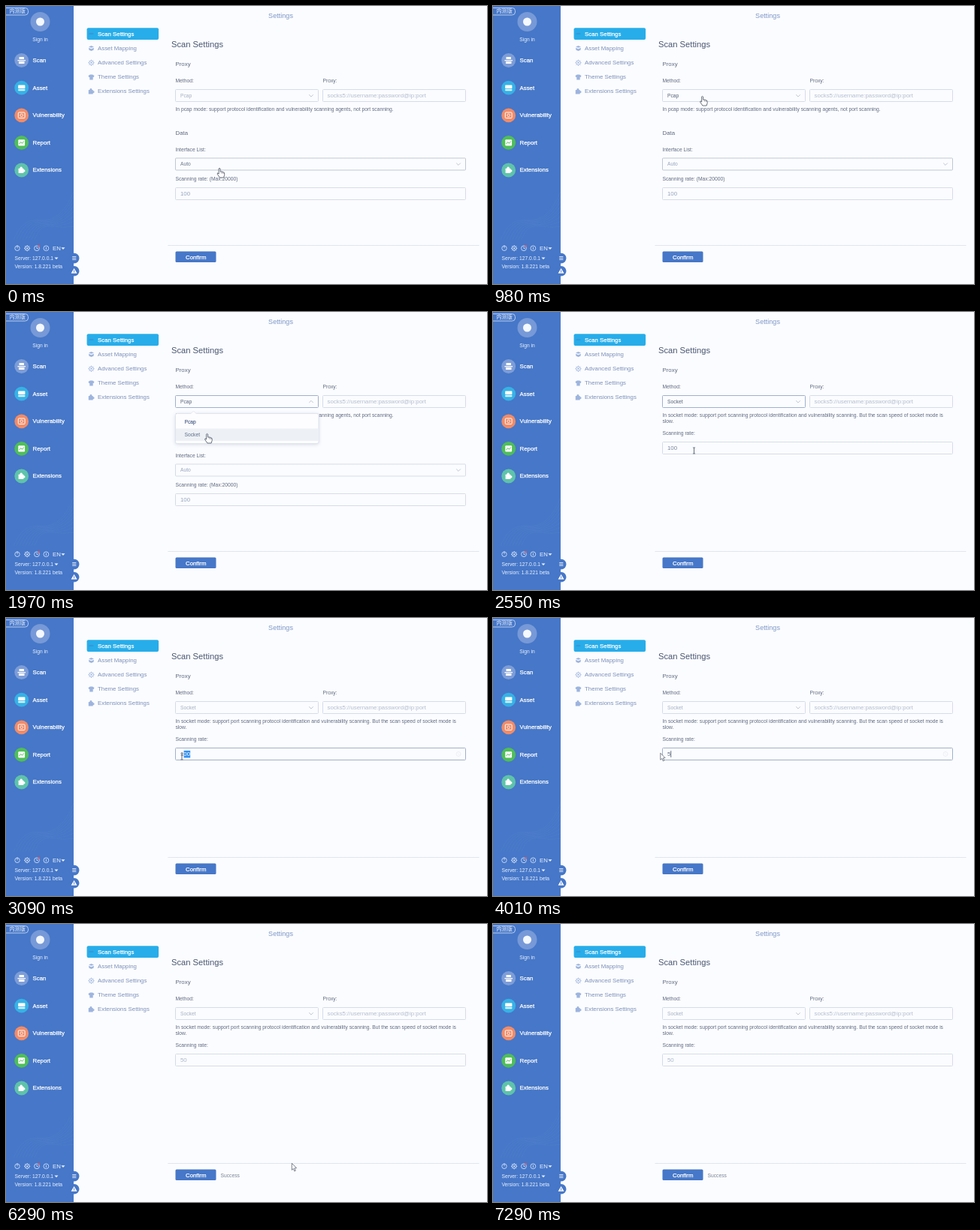
Write an HTML page with a canvas that moves like this. It is 640 by 371 pixels and loops after 7750 ms.

```html
<!DOCTYPE html>
<html lang="en">
<head>
<meta charset="utf-8">
<title>Settings</title>
<style>
html, body { margin: 0; width: 640px; height: 371px; overflow: hidden; background: #fbfcff; }
canvas { display: block; }
</style>
</head>
<body>
<canvas id="stage" width="640" height="371"></canvas>
<script>
const ctx = document.getElementById('stage').getContext('2d');
const LOOP = 7750;
const PAGE = '#fbfcff', BLUE = '#4677c8', LABEL = '#606b81', DARK = '#4a5771',
      PALE = '#aeb8ca', LINE = '#d5dce9', FOCUS = '#a0b0cb', ICON = '#9db4de';
const SMALL = 6.73, MID = 7.85;

// time, shape, x, y: the pointer holds each place until the next entry
const pointer = [
  [0, 'hand', 286, 223], [550, 'hand', 286, 221], [800, 'hand', 285, 190],
  [890, 'hand', 282, 152], [980, 'hand', 280.5, 127], [1630, 'hand', 278, 134],
  [1730, 'hand', 275, 146], [1880, 'hand', 272, 159], [1970, 'hand', 269.5, 169],
  [2340, 'arrow', 267, 167], [2550, 'beam', 267.5, 185], [2810, 'beam', 258, 185],
  [2900, 'beam', 248, 185], [2990, 'beam', 240, 185], [3080, 'beam', 234, 185],
  [3180, 'beam', 228, 185], [3270, 'arrow', 222.5, 180], [4650, 'arrow', 228, 205],
  [4740, 'arrow', 238, 245], [4820, 'arrow', 247, 285], [4910, 'arrow', 256, 325],
  [5100, 'hand', 258, 336], [5190, 'hand', 259.5, 339], [6110, 'arrow', 285, 327],
  [6200, 'arrow', 330, 320], [6290, 'arrow', 380, 319], [6380, 'arrow', 430, 323],
  [6470, 'arrow', 480, 333], [6560, 'arrow', 525, 343], [6650, 'arrow', 556, 351],
  [7110, 'arrow', 588, 358], [7200, 'arrow', 628, 365], [7290, 'none', 0, 0]
];

// y is the middle of the capitals; the baseline sits on a whole pixel
function text(s, x, y, size, color, weight = 0, align = 'left') {
  const base = Math.round(y + size * 0.36 - 0.4);
  ctx.font = `${size}px "Liberation Sans", Arial, "Noto Sans CJK SC", "Noto Sans CJK", sans-serif`;
  ctx.textAlign = align;
  ctx.fillStyle = color;
  ctx.fillText(s, x, base);
  if (weight) {
    ctx.strokeStyle = color;
    ctx.lineWidth = weight;
    ctx.strokeText(s, x, base);
  }
}

function box(x, y, w, h, r, fill, stroke) {
  ctx.beginPath();
  ctx.roundRect(x, y, w, h, r);
  if (fill) { ctx.fillStyle = fill; ctx.fill(); }
  if (stroke) { ctx.strokeStyle = stroke; ctx.lineWidth = 1; ctx.stroke(); }
}

function disc(x, y, r, color) {
  ctx.beginPath();
  ctx.arc(x, y, r, 0, 7);
  ctx.fillStyle = color;
  ctx.fill();
}

function ring(x, y, r, color, width = 0.8) {
  ctx.beginPath();
  ctx.arc(x, y, r, 0, 7);
  ctx.strokeStyle = color;
  ctx.lineWidth = width;
  ctx.stroke();
}

function path(points, x, y, fill, stroke, width = 0.8) {
  ctx.beginPath();
  points.forEach(([px, py]) => ctx.lineTo(x + px, y + py));
  if (fill) { ctx.closePath(); ctx.fillStyle = fill; ctx.fill(); }
  if (stroke) { ctx.strokeStyle = stroke; ctx.lineWidth = width; ctx.stroke(); }
}

function gear(x, y, r, color) {
  ring(x, y, r * 0.72, color, 0.9);
  ctx.lineWidth = 1;
  for (let i = 0; i < 8; i++) {
    const c = Math.cos(i * Math.PI / 4), s = Math.sin(i * Math.PI / 4);
    ctx.beginPath();
    ctx.moveTo(x + c * r * 0.75, y + s * r * 0.75);
    ctx.lineTo(x + c * r, y + s * r);
    ctx.stroke();
  }
  disc(x, y, r * 0.28, color);
}

function puzzle(x, y, s, color) {
  box(x - s, y - s * 0.6, s * 1.7, s * 1.6, 0.5, color);
  disc(x - s * 0.1, y - s * 0.7, s * 0.42, color);
  disc(x + s * 0.8, y + s * 0.2, s * 0.42, color);
}

const chevron = (x, y, dir, color) =>
  path([[-2.8, -1.4 * dir], [0, 1.4 * dir], [2.8, -1.4 * dir]], x, y, null, color, 0.8);

const drop = (x, y) => path([[-2.5, -1.4], [2.5, -1.4], [0, 1.4]], x, y, '#e8effb');

function sideItem(label, y, color) {
  disc(20.7, y, 9.4, color);
  text(label, 35.5, y, MID, '#fff', 0.25);
}

function mesh() {
  ctx.save();
  ctx.beginPath();
  ctx.rect(0, 230, 90, 90);
  ctx.clip();
  ctx.strokeStyle = 'rgba(255,255,255,.06)';
  ctx.lineWidth = 0.6;
  for (let i = 0; i < 8; i++) {
    ctx.beginPath();
    ctx.moveTo(10 + i * 4, 312);
    ctx.bezierCurveTo(35 + i * 2, 255 + i * 4, 60, 320 - i * 3, 91, 245 + i * 7);
    ctx.stroke();
  }
  ctx.restore();
}

function sidebar() {
  ctx.fillStyle = BLUE;
  ctx.fillRect(0, 0, 90, 371);
  mesh();

  box(-4, 2.5, 33.5, 9.5, 4, null, '#b9cdf0');
  text('内测版', 4.5, 7.3, 7.1, '#eef4ff');
  disc(45.5, 21, 13, '#7799d7');
  disc(45.5, 21, 5.5, '#f4f8ff');
  text('Sign in', 45.5, 44.5, SMALL, '#eaf1ff', 0, 'center');

  sideItem('Scan', 72.5, '#7d9dd8');
  box(17.5, 68, 6.5, 3, 0.5, '#fff');
  box(15.5, 72, 10.5, 1.3, 0, '#fff');
  box(17, 74, 7.5, 3, 0.5, '#fff');

  sideItem('Asset', 109.2, '#36b2e6');
  box(16.2, 105.5, 9.2, 4.5, 0.6, '#fff');
  box(16.2, 110.8, 9.2, 2.4, 0.6, '#d6f1fc');

  sideItem('Vulnerability', 145.9, '#f18b68');
  box(16.3, 142, 8.8, 7.6, 1, null, '#fff');
  ring(20.7, 145.8, 1.8, '#fff');

  sideItem('Report', 182.4, '#4fbe58');
  box(16.3, 178.3, 8.8, 8.2, 1, '#fff');
  path([[-3, 1.5], [-1, -1], [0.8, 0.8], [3, -2]], 20.7, 182.5, null, '#4fbe58', 1);

  sideItem('Extensions', 219, '#5ec3aa');
  puzzle(20.6, 219.1, 4, '#fff');

  const pale = '#dfe9fb';
  ring(15, 323.3, 3.2, pale);
  path([[0, -4], [0, 0]], 15, 323.3, null, pale);
  gear(28.2, 323.3, 4, pale);
  ring(41, 323.3, 3.4, pale);
  path([[0, -2], [0, 0.3], [1.7, 0.3]], 41, 323.3, null, pale);
  disc(43.7, 320.3, 1.2, '#f0545a');
  ring(53.4, 323.3, 3.4, pale);
  path([[0, -1.8], [0, 1.8]], 53.4, 323.3, null, pale);
  text('EN', 62, 323.4, MID, '#eaf1ff');
  drop(76, 323.7);
  text('Server: 127.0.0.1', 11.5, 336.6, SMALL, '#eaf1ff');
  drop(67, 336.8);
  text('Version: 1.8.221 beta', 11.5, 348.3, SMALL, '#eaf1ff');

  disc(90.7, 336.6, 6.8, BLUE);
  for (let i = -1; i < 2; i++) box(88.2, 336.2 + i * 2, 5.2, 0.8, 0, '#fff');
  disc(90.7, 353.8, 6.8, BLUE);
  path([[0, -3.8], [4, 3], [-4, 3]], 90.6, 353.8, '#fff');
  path([[0, -1.4], [0, 1.9]], 90.6, 353.8, null, BLUE, 0.9);
}

function nav() {
  text('Settings', 365.5, 13, 9.1, '#7e98c6', 0, 'center');
  box(107.6, 29.3, 95.5, 15.8, 2, '#27adea');
  box(110.5, 36.3, 6, 1.4, 0.5, '#438fd0');
  text('Scan Settings', 122, 37.4, MID, '#fff', 0.25);
  ['Asset Mapping', 'Advanced Settings', 'Theme Settings', 'Extensions Settings']
    .forEach((s, i) => text(s, 122, 56.6 + i * 19.15, MID, '#7c90b9'));
  path([[-3.5, -2], [0, -3.4], [3.5, -2], [0, -0.7]], 113.5, 56.5, ICON);
  path([[-3.5, -0.7], [0, 0.7], [3.5, -0.7], [3, 2.2], [0, 3.5], [-3, 2.2]], 113.5, 56.5, ICON);
  gear(113.5, 75.7, 4, ICON);
  path([[-4, -2], [-1.5, -3.4], [1.5, -3.4], [4, -2], [3, 0.3], [2.2, -0.2],
    [2.2, 3.5], [-2.2, 3.5], [-2.2, -0.2], [-3, 0.3]], 113.5, 95, ICON);
  puzzle(113.3, 114, 3.5, ICON);
}

const field = (x, y, w, border) => box(x, y, w, 16, 1, PAGE, border);

function pcapForm(t) {
  text('In pcap mode: support protocol identification and vulnerability scanning agents, not port scanning.',
    225.5, 138.3, SMALL, LABEL);
  text('Data', 225.5, 169.6, MID, LABEL);
  text('Interface List:', 225.5, 191.5, SMALL, LABEL);
  field(225.5, 203, 386, t < 1350 ? '#c0c7d5' : LINE);
  text('Auto', 232, 211.3, SMALL, t < 800 ? '#6b7789' : '#98a5bd');
  chevron(602, 211, 1, PALE);
  text('Scanning rate: (Max:20000)', 225.5, 231, SMALL, LABEL);
  field(225.5, 242.5, 386, LINE);
  text('100', 232, 250.8, MID, '#98a5bd');
}

function rateInput(t) {
  const focused = t >= 2810 && t < 5370;
  const border = t < 2810 ? LINE : t < 5460 ? FOCUS : t < 5550 ? '#bcc7da' : LINE;
  field(225.5, 173.5, 386, border);
  const value = t < 4010 ? '100' : t < 4190 ? '5' : '50';
  text(value, 232, 181.8, MID, focused ? '#66738a' : t < 2810 ? '#7c879b' : PALE);
  if (focused) {
    ring(602, 181.5, 3, '#e6e9f0', 0.7);
    path([[-1, -1], [1, 1]], 602, 181.5, null, '#e6e9f0');
  }
  if (t >= 2990 && t < 4010) {
    const from = t < 3080 ? 240.7 : t < 3180 ? 236.4 : 232;
    ctx.save();
    ctx.beginPath();
    ctx.rect(from, 177, 245.2 - from, 9.5);
    ctx.clip();
    ctx.fillStyle = '#3390f2';
    ctx.fillRect(from, 177, 20, 10);
    text(value, 232, 181.8, MID, '#fff');
    ctx.restore();
  }
  if (t >= 4010 && t < 5100) box(t < 4190 ? 236.4 : 241, 177.3, 0.8, 8.7, 0, '#4a5364');
}

function socketForm(t) {
  text('In socket mode: support port scanning protocol identification and vulnerability scanning. But the scan speed of socket mode is',
    225.5, 138.3, SMALL, LABEL);
  text('slow.', 225.5, 146.2, SMALL, LABEL);
  text('Scanning rate:', 225.5, 162.3, SMALL, LABEL);
  rateInput(t);
  if (t >= 5460) text('Success', 285.5, 335.5, SMALL, '#7b8496');
}

function methodSelect(t) {
  const active = t >= 1160 && t < 2900;
  field(225.5, 111.5, 190, active ? FOCUS : LINE);
  const dark = t >= 980 && t < 2900;
  text(t < 2250 ? 'Pcap' : 'Socket', 232, 119.7, SMALL, dark ? '#566377' : '#a6b0c2');
  if (t >= 1350 && t < 1630) path([[-2.5, 1], [-1, -0.8], [1, -0.8], [2.4, 1]], 404.5, 124, null, PALE);
  else chevron(406, 119.7, t >= 1630 && t < 2250 ? -1 : 1, PALE);
}

function menu(t) {
  if (t < 1350 || t >= 2340) return;
  ctx.save();
  ctx.globalAlpha = t < 1430 || t >= 2250 ? 0.5 : 1;
  ctx.shadowColor = 'rgba(60,75,110,.22)';
  ctx.shadowBlur = 5;
  ctx.shadowOffsetY = 1;
  box(225.5, 135.5, 190.5, 40, 2, '#fdfdff');
  ctx.shadowColor = 'transparent';
  box(225.5, 135.5, 190.5, 40, 2, null, '#dfe4ed');
  path([[-4, 4], [0, 0], [4, 4]], 249.5, 132, '#fdfdff');
  path([[-4, 4], [0, 0], [4, 4]], 249.5, 132, null, '#dfe4ed');
  if (t >= 1730) {
    ctx.fillStyle = '#edf1f6';
    ctx.fillRect(226, t < 1880 ? 138.5 : 155.5, 189.5, 16.5);
  }
  const down = t < 1630 ? 0 : 0.5;
  text('Pcap', 237.5, 146.6 + down, SMALL, '#3d527d', t < 1880 ? 0.25 : 0.1);
  text('Socket', 237.5, 163 + down, SMALL, '#5f6e89');
  ctx.restore();
}

function form(t) {
  text('Scan Settings', 220, 51, 11.2, DARK);
  text('Proxy', 225.5, 78, MID, LABEL);
  text('Method:', 225.5, 100.3, SMALL, LABEL);
  text('Proxy:', 421.5, 100.3, SMALL, LABEL);
  field(421.5, 111.5, 190, LINE);
  text('socks5://username:password@ip:port', 427.5, 119.8, MID, '#b4bdce');
  methodSelect(t);
  if (t < 2340) pcapForm(t); else socketForm(t);
  ctx.fillStyle = '#e1e5ed';
  ctx.fillRect(215.5, 319, 414, 1);
  box(225.5, 327.6, 54, 14.4, 1.5, BLUE);
  text('Confirm', 252.7, 335.3, MID, '#fff', 0.25, 'center');
  menu(t);
}

const shapes = {
  none() {},
  hand(x, y) {
    ctx.lineJoin = 'round';
    path([[-2.9, -6], [-2, -6.6], [-1, -6], [-0.8, -1.8], [1.2, -2], [3, -1.3], [4.6, -0.4],
      [4.7, 2.5], [3.6, 6], [-1.6, 6], [-4.8, 1.2], [-4.5, -0.2], [-2.8, 1]], x, y, '#fff', '#454e5e', 0.8);
    path([[1.1, -1.8], [1.1, 0.8]], x, y, null, '#667', 0.6);
    path([[3, -1], [3, 1]], x, y, null, '#667', 0.6);
  },
  arrow(x, y) {
    path([[0, 0], [0, 9], [2, 7.2], [3.5, 10.6], [5, 9.9], [3.5, 6.6], [6.3, 6.4]],
      x + 0.3, y + 0.3, '#fff', '#5d6575');
  },
  beam(x, y) {
    const ink = '#555d6c';
    path([[0, -3.8], [0, 3.8]], x, y, null, ink, 0.9);
    path([[-1.6, -4], [1.6, -4]], x, y, null, ink);
    path([[-1.6, 4], [1.6, 4]], x, y, null, ink);
  }
};

function draw(t) {
  ctx.fillStyle = PAGE;
  ctx.fillRect(0, 0, 640, 371);
  sidebar();
  nav();
  form(t);
  const [, kind, x, y] = pointer.findLast(p => p[0] <= t);
  shapes[kind](x, y);
}

const start = performance.now();
function tick() {
  draw((performance.now() - start) % LOOP);
  requestAnimationFrame(tick);
}
tick();
</script>
</body>
</html>
```
